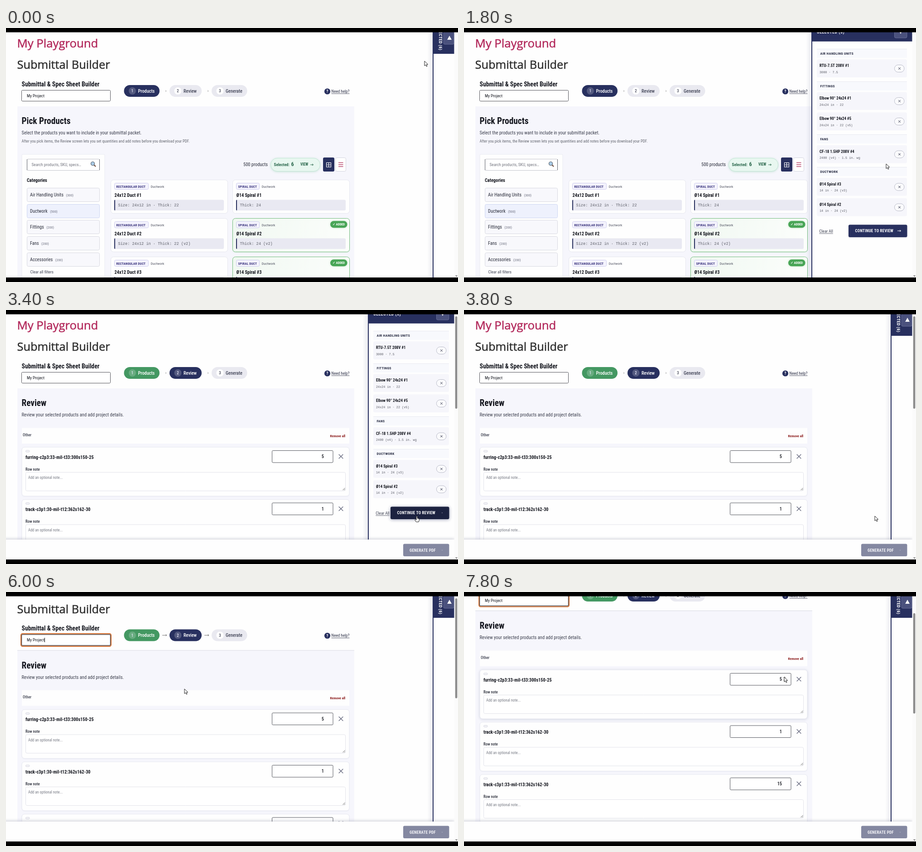
Write an HTML page with a canvas that moves like this. It is 998x561 px and loops after 8000 ms.

```html
<!DOCTYPE html>
<html lang="en">
<head>
<meta charset="utf-8">
<title>Submittal Builder</title>
<style>
html, body { margin: 0; width: 100%; height: 100%; overflow: hidden; background: #000; }
canvas { display: block; width: 998px; height: 561px; }
</style>
</head>
<body>
<canvas id="stage" width="998" height="561"></canvas>
<script>
const ctx = document.getElementById('stage').getContext('2d');
const LOOP = 8000, STEP = 200;
const NAVY = '#28305f', INK = '#15171f', PAGE = '#fefefe', GREEN = '#449862';
const FACE = '"Roboto Condensed", Roboto, sans-serif';
const MONO = '"Liberation Mono", monospace';

// Narrow the face only where no condensed cut is installed.
function widthOf(font) {
  ctx.font = font;
  return ctx.measureText('Select the products you want').width;
}
const ratio = widthOf('condensed 40px ' + FACE) / widthOf('40px Roboto, sans-serif');
const squeeze = ratio > 0.95 ? 0.885 : 1;

// Text centred vertically on y; returns the right edge.
function text(str, x, y, size, color, weight = 400, { align = 'left', gap = 0 } = {}) {
  ctx.save();
  ctx.font = `condensed ${weight} ${size}px ${FACE}`;
  ctx.letterSpacing = gap + 'px';
  ctx.fillStyle = color;
  ctx.textAlign = align;
  ctx.translate(x, y + size * 0.355);
  ctx.scale(squeeze, 1);
  ctx.fillText(str, 0, 0);
  const w = ctx.measureText(str).width * squeeze;
  ctx.restore();
  return x + w;
}

function mono(str, x, base, size) {
  ctx.font = `${size}px ${MONO}`;
  ctx.fillStyle = '#5c5e68';
  ctx.fillText(str, x, base);
}

// Regular face thickened slightly to a medium weight.
function heading(str, base, size, color) {
  ctx.font = `400 ${size}px "Open Sans", "Noto Sans", sans-serif`;
  ctx.fillStyle = ctx.strokeStyle = color;
  ctx.lineWidth = 0.55;
  ctx.fillText(str, 24.5, base);
  ctx.strokeText(str, 24.5, base);
}

function rect(x, y, w, h, fill) {
  ctx.fillStyle = fill;
  ctx.fillRect(x, y, w, h);
}

function box(x, y, w, h, r, fill, stroke, line = 1) {
  ctx.beginPath();
  ctx.roundRect(x, y, w, h, r);
  if (fill) { ctx.fillStyle = fill; ctx.fill(); }
  if (stroke) { ctx.strokeStyle = stroke; ctx.lineWidth = line; ctx.stroke(); }
}

function shadowed(color, blur, dy, draw) {
  ctx.save();
  ctx.shadowColor = color;
  ctx.shadowBlur = blur;
  ctx.shadowOffsetY = dy;
  draw();
  ctx.restore();
}

function disc(x, y, r, fill) {
  ctx.beginPath();
  ctx.arc(x, y, r, 0, 7);
  ctx.fillStyle = fill;
  ctx.fill();
}

function lines(color, width, ...segs) {
  ctx.strokeStyle = color;
  ctx.lineWidth = width;
  ctx.beginPath();
  for (const [x1, y1, x2, y2] of segs) { ctx.moveTo(x1, y1); ctx.lineTo(x2, y2); }
  ctx.stroke();
}

function poly(fill, ...pts) {
  ctx.beginPath();
  pts.forEach(([x, y]) => ctx.lineTo(x, y));
  ctx.closePath();
  ctx.fillStyle = fill;
  ctx.fill();
}

function arrow(x, y, w, color) {
  lines(color, 1, [x, y, x + w, y], [x + w - 2.5, y - 2, x + w, y], [x + w - 2.5, y + 2, x + w, y]);
}

// Piecewise linear value from [time, value...] keys.
function along(keys, t) {
  let a = keys[0];
  for (const b of keys) {
    if (t < b[0]) {
      const k = Math.max(0, (t - a[0]) / (b[0] - a[0]));
      return a.slice(1).map((v, i) => v + (b[i + 1] - v) * k);
    }
    a = b;
  }
  return a.slice(1);
}

const POINTER = [
  [0, 924, 73], [200, 945, 52], [400, 974, 24], [800, 974, 24], [1000, 948, 48], [1200, 948, 48],
  [1400, 946, 68], [1800, 932, 300], [2000, 918, 488], [2200, 910, 470], [2400, 907, 455],
  [3800, 907, 455], [4000, 890, 440], [4400, 751, 338], [4600, 560, 268], [4800, 262, 176],
  [5000, 160, 154], [5400, 160, 154], [5800, 394, 214], [6800, 394, 214], [7000, 450, 224],
  [7400, 640, 205], [7800, 707, 188]
];
const PANEL = [[0, 943], [600, 943], [800, 858], [1000, 775.5], [1200, 769], [1400, 768],
  [3200, 768], [3400, 800], [3600, 915], [3800, 943]];
const SCROLL = [[0, 0], [5600, 0], [5800, 24], [6000, 43.5], [6200, 58], [6400, 92], [6600, 122], [6800, 131]];

function pill(x, w, n, label, state) {
  const idle = state === 'idle';
  box(x, 126, w, 26, 13, idle ? '#e9e9f0' : state === 'done' ? GREEN : NAVY);
  disc(x + 18.5, 139, 8, idle ? '#fff' : 'rgba(255,255,255,.2)');
  text(n, x + 18.5, 139, 8.5, idle ? '#3c3f50' : '#eef', 500, { align: 'center' });
  text(label, x + 31, 139, 10.3, idle ? '#45485a' : '#fff', 500);
}

function header(t, review, scroll) {
  heading('My Playground', 43, 25.7, '#b32b5d');
  heading('Submittal Builder', 90, 25.4, '#303030');
  text('Submittal & Spec Sheet Builder', 34.5, 124, 13.75, INK, 700);

  const focus = review && t >= 5000;
  if (t >= 5200) box(33, 135.5, 199, 28, 3.5, null, '#d8702f', 2);
  box(34.5, 137.5, 196, 24, 2, '#fff', focus && t < 5200 ? '#6a3a30' : '#55565c', focus ? 1.5 : 1);
  const end = text('My Project', 46, 149.5, 9.25, INK);
  if (focus && t % 1000 < 500) rect(end, 144.5, 1, 10, '#111');

  pill(260.5, 78.5, '1', 'Products', review ? 'done' : 'active');
  pill(361, 71, '2', 'Review', review ? 'active' : 'idle');
  pill(454, 78.5, '3', 'Generate', 'idle');
  for (const x of [353, 446]) {
    if (scroll > 0) arrow(x - 8, 139, 10, '#777');
    else text('›', x, 138.5, 9, '#666', 400, { align: 'center' });
  }
  disc(709.5, 140, 6.6, NAVY);
  text('?', 709.5, 140, 8.5, '#fff', 700, { align: 'center' });
  const right = text('Need help?', 718.5, 139.5, 9.15, '#2b2f45');
  lines('#2b2f45', 0.8, [718.5, 145, right, 145]);

  rect(25, 173, 744, 1400, '#f6f6fc');
  if (scroll > 0) lines('#d6d8e2', 1, [25, 172.5, 769, 172.5]);
}

function sidebar() {
  box(35, 279, 183, 300, 2, PAGE, '#e9eaf1');
  box(46.5, 289.5, 160, 25, 2, '#fff', '#c4c5cc');
  lines('#5c5e68', 1, [46.5, 290, 46.5, 314], [206.5, 290, 206.5, 314]);
  text('Search products, SKU, specs…', 56.5, 302, 9.25, '#73757f');
  lines('#6b4a3a', 2.2, [194.5, 302.5, 198, 306]);
  disc(191.5, 299.5, 4, '#a9cbe6');
  ctx.strokeStyle = '#59616c';
  ctx.lineWidth = 1.2;
  ctx.stroke();
  text('Categories', 46, 336.5, 10.3, INK, 700);
  const items = [['Air Handling Units', 300], ['Ductwork', 500], ['Fittings', 200], ['Fans', 200], ['Accessories', 200]];
  items.forEach(([name, count], i) => {
    const y = 353.5 + Math.round(i * 35.7), on = i === 1;
    box(46.5, y, 160, 30, 3, on ? '#eef1fd' : '#f8f8fc', on ? '#cdd5f2' : '#d8d9e1');
    const end = text(name, 53, y + 15.3, 10.4, '#2a2d3a');
    text(`(${count})`, end + 5.5, y + 16, 7.9, '#6d7080');
  });
  text('Clear all filters', 53.5, 539, 9.05, '#3d4152');
}

function toolbar() {
  text('500 products', 524, 301.5, 10.4, '#2a2d3a');
  shadowed('rgba(70,170,120,.3)', 5, 1, () => box(584.5, 287.5, 109, 29, 14.5, '#e8f7f0'));
  box(584.5, 287.5, 109, 29, 14.5, null, '#c2e6d5');
  text('Selected:', 591.5, 301.5, 9.1, '#2d6a4f', 700);
  text('6', 629.5, 301, 12.2, '#2d6a4f', 700);
  text('VIEW', 650, 301.5, 8.3, '#2d6a4f', 700);
  arrow(672, 302, 6.5, '#2d6a4f');
  box(700, 286, 25, 31, 3, NAVY);
  ctx.strokeStyle = '#fff';
  ctx.lineWidth = 1.1;
  ctx.strokeRect(707.5, 297.5, 10, 9.5);
  lines('#fff', 1.1, [712.5, 297.5, 712.5, 307], [707.5, 302.2, 717.5, 302.2]);
  box(727.5, 286.5, 23, 30, 3, '#fff', '#d3d4de');
  lines('#b8476d', 1.4, ...[297.5, 301.8, 306].map(y => [734, y, 744.5, y]));
}

function product(x, y, tag, tagW, title, spec, added) {
  if (added) {
    const g = ctx.createLinearGradient(x, y, x + 258, y + 74);
    g.addColorStop(0, '#f0f8f1');
    g.addColorStop(1, '#fcfefc');
    shadowed('rgba(76,175,80,.2)', 3, 1, () => box(x, y, 258, 74, 6, g));
    box(x, y, 258, 74, 6, null, '#76bd80');
    shadowed('rgba(76,175,80,.35)', 4, 0, () => box(x + 215.5, y + 5.8, 37.5, 15, 7.5, '#48a556'));
    text('✓ ADDED', x + 234, y + 13.2, 7, '#fff', 700, { align: 'center' });
  } else {
    box(x, y, 258, 74, 6, PAGE, '#e6e7ef');
  }
  box(x + 8, y + 7, tagW, 14, 3, '#f4f3fd', '#cfcdee');
  text(tag, x + 12, y + 14.5, 7.2, '#38327c', 700, { gap: 0.2 });
  text('Ductwork', x + tagW + 13, y + 14.3, 8, '#555866');
  text(title, x + 8, y + 33.7, 10.3, INK, 700);
  box(x + 7.5, y + 44, 242, 23.5, 3, '#e9e9f2');
  box(x + 7.5, y + 44, 2, 23.5, [2, 0, 0, 2], NAVY);
  mono(spec, x + 16, y + 58, 8.6);
}

function products() {
  text('Pick Products', 34.5, 205.5, 19.35, INK, 700);
  text('Select the products you want to include in your submittal packet.', 34.5, 231.5, 10.42, '#3b3e4c');
  text('After you pick items, the Review screen lets you set quantities and add notes before you download your PDF.',
    34.5, 249.5, 8.72, '#63666f');
  sidebar();
  toolbar();
  for (let i = 0; i < 3; i++) {
    const y = 335.5 + i * 85, v = i ? ` (v${i + 1})` : '';
    product(231.5, y, 'RECTANGULAR DUCT', 75, `24x12 Duct #${i + 1}`, 'Size: 24x12 in · Thick: 22' + v);
    product(500.5, y, 'SPIRAL DUCT', 51, `Ø14 Spiral #${i + 1}`, 'Thick: 24' + v, i > 0);
  }
}

function row(y, name, qty, hover) {
  shadowed(`rgba(40,48,95,${hover ? 0.2 : 0.06})`, hover ? 6 : 3, 1,
    () => box(35, y, 723, 108, 6, PAGE));
  box(35, y, 723, 108, 6, null, '#e8e9f1');
  box(43.5, y + 7, 8.5, 3.8, 2, '#f4f4f8', '#cfd0da', 0.8);
  text(name, 43, y + 22, 10.2, INK, 700);
  box(587.5, y + 7.5, 134.5, 26.5, 2, '#fff', '#55575f');
  text(qty, 702, y + 20.5, 10.3, INK, 500, { align: 'right' });
  if (hover) lines('#888', 1, [705, y + 18, 708, y + 15], [708, y + 15, 711, y + 18], [705, y + 22, 708, y + 25], [708, y + 25, 711, y + 22]);
  lines('#6a6d82', 1.4, [734.7, y + 15.7, 744.3, y + 25.3], [744.3, y + 15.7, 734.7, y + 25.3]);
  text('Row note', 43, y + 48.5, 8.6, '#30333f', 500);
  box(43.5, y + 55.5, 706, 41, 3, '#fff', '#e2e3ea');
  text('Add an optional note...', 49, y + 67.2, 8.5, '#777a84');
  lines('#555', 0.9, [743.5, y + 95, 748.5, y + 90], [746.5, y + 95, 748.5, y + 93]);
}

function reviewPage(t) {
  text('Review', 34.5, 205.5, 19.3, INK, 700);
  text('Review your selected products and add project details.', 34.5, 231.5, 10.5, '#3b3e4c');
  rect(35, 260.5, 723, 34.5, PAGE);
  text('Other', 37, 275.8, 8.7, '#5b5e6b', 700);
  text('Remove all', 715.5, 278, 7.7, '#8e2020', 700);
  row(303, 'furring-c2p3:33-mil-t33:300s150-25', '5', t >= 7600);
  row(418.5, 'track-c3p1:30-mil-t12:362s162-30', '1');
  row(534, 'track-c3p1:33-mil-t13:362s162-30', '15');
}

function closedPanel() {
  rect(943, 9, 47, 542, PAGE);
  rect(942, 9, 2, 542, NAVY);
  rect(942, 9, 47.5, 48, NAVY);
  ctx.save();
  ctx.translate(959, 49);
  ctx.rotate(Math.PI / 2);
  text('SELECTED (6)', 0, 0, 9.8, '#fff', 700, { align: 'right', gap: 0.2 });
  ctx.restore();
  box(966, 8, 23, 28, 3, '#4a517d', '#7178a0', 0.8);
  poly('#fff', [974.2, 26], [984, 26], [979.1, 17]);
}

const PICKS = [
  ['AIR HANDLING UNITS', 56], ['FITTINGS', 128], ['FANS', 245], ['DUCTWORK', 317],
  ['RTU-7.5T 208V #1', 89.5, '3000 · 7.5'],
  ['Elbow 90° 24x24 #1', 161.5, '24x24 in · 22'],
  ['Elbow 90° 24x24 #5', 206.5, '24x24 in · 22 (v5)'],
  ['CF-18 1.5HP 208V #4', 279, '2400 (v4) · 1.5 in. wg'],
  ['Ø14 Spiral #3', 351, '14 in · 24 (v3)'],
  ['Ø14 Spiral #2', 396, '14 in · 24 (v2)']
];

function openPanel(x, hover) {
  ctx.save();
  ctx.beginPath();
  ctx.rect(x - 1, 9, 990.5 - x, 542);
  ctx.clip();
  rect(x, 9, 222, 542, PAGE);
  rect(x - 1, 9, 2, 542, NAVY);
  rect(x - 1, 9, 223, 20.7, NAVY);
  text('SELECTED (6)', x + 11, 8.5, 10.2, '#fff', 700, { gap: 0.4 });
  box(950.5, -6, 27.5, 28, 3, '#4a517d', '#7178a0', 0.8);
  poly('#fff', [959.5, 5], [968.5, 5], [964, 13]);
  for (const [name, y, spec] of PICKS) {
    if (!spec) {
      rect(x + 11, y - 10, 967 - x, 20, '#f8f9fd');
      lines('#e8e9f1', 1, [x + 11, y - 9.5, 978, y - 9.5]);
      text(name, x + 18.5, y, 7.8, '#2b2f45', 700, { gap: 0.3 });
      continue;
    }
    box(x + 11, y - 20, 967 - x, 39.5, 3, '#f6f6fb');
    text(name, x + 17, y - 6.5, 8.8, INK, 700);
    mono(spec, x + 17, y + 10, 6.8);
    box(950.5, y - 8, 21.5, 16, 8, '#fbfbfd', '#b9bbc8');
    lines('#2b2f45', 1, [959.2, y - 2.3, 963.8, y + 2.3], [963.8, y - 2.3, 959.2, y + 2.3]);
  }
  const right = text('Clear All', x + 16.3, 448.5, 9.2, '#3d4152');
  lines('#3d4152', 0.8, [x + 16.3, 454, right, 454]);
  shadowed(hover ? 'rgba(40,48,95,.5)' : 'rgba(40,48,95,.2)', hover ? 7 : 3, 1,
    () => box(849, 434.5, 129.5, 27.5, 3, hover ? '#1c2240' : NAVY));
  text('CONTINUE TO REVIEW', 863.5, 448, 9, '#fff', 700, { gap: 0.2 });
  if (hover) disc(963, 448, 0.8, '#aab');
  else arrow(957, 448, 7.5, '#fff');
  ctx.restore();
}

function panel(t, x) {
  const g = ctx.createLinearGradient(x - 13, 0, x, 0);
  g.addColorStop(0, 'rgba(40,48,95,0)');
  g.addColorStop(1, 'rgba(40,48,95,.1)');
  rect(x - 13, 9, 13, 542, g);
  if (x > 940) closedPanel();
  else openPanel(x, t >= 2600);
}

function footer() {
  shadowed('rgba(30,35,70,.25)', 7, -1, () => rect(-10, 507, 1000, 60, PAGE));
  box(877, 516.5, 101.5, 27.5, 3, '#8488a1');
  text('GENERATE PDF', 891, 530.5, 9, '#f4f4f8', 700, { gap: 0.2 });
  disc(963, 530.5, 0.8, '#b9bccb');
}

function scrollbar(review, scroll) {
  rect(990, 9, 8, 542, '#fbfbfb');
  poly('#777', [991.8, 546.5], [997, 546.5], [994.4, 549.5]);
  if (!review) return;
  const top = 14 + Math.max(0, scroll - 43.5) * 0.375;
  box(991.8, top, 4.6, 218 + scroll * 0.385 - top, 2.3, '#8d8d8d');
}

function pointer(t, x, y) {
  ctx.save();
  ctx.translate(x, y);
  ctx.lineJoin = 'round';
  const hand = (t >= 400 && t <= 800) || (t >= 2400 && t < 3600);
  if (t >= 4800 && t <= 5400) {
    lines('#222', 1, [0, -4.5, 0, 4.5], [-2, -5, 2, -5], [-2, 5, 2, 5]);
  } else if (hand) {
    ctx.beginPath();
    ctx.moveTo(-1, 1);
    ctx.quadraticCurveTo(0, -0.5, 1.2, 1);
    for (const [px, py] of [[1.2, 5], [5, 6], [5.3, 9.5], [4, 13], [-1.5, 13], [-4.5, 8.5], [-3.5, 7.5], [-1, 9]]) ctx.lineTo(px, py);
    ctx.closePath();
    ctx.fillStyle = '#fff';
    ctx.fill();
    ctx.strokeStyle = '#222';
    ctx.lineWidth = 1;
    ctx.stroke();
  } else {
    poly('#fff', [0, 0], [0, 10.5], [2.5, 8.3], [4.2, 12], [6, 11.2], [4.4, 7.6], [7.5, 7.3]);
    ctx.strokeStyle = '#222';
    ctx.lineWidth = 1;
    ctx.stroke();
  }
  ctx.restore();
}

function draw(t) {
  const review = t >= 3400;
  const [scroll] = along(SCROLL, t), [x] = along(PANEL, t);
  rect(0, 0, 998, 561, PAGE);
  ctx.save();
  ctx.translate(0, -scroll);
  header(t, review, scroll);
  if (review) reviewPage(t);
  else products();
  ctx.restore();
  panel(t, x);
  if (review) footer();
  scrollbar(review, scroll);
  pointer(t, ...along(POINTER, t));
  rect(0, 0, 998, 9.5, '#000');
  rect(0, 551, 998, 10, '#000');
}

const start = performance.now();
function tick() {
  const t = (performance.now() - start) % LOOP;
  draw(Math.floor(t / STEP) * STEP);
  requestAnimationFrame(tick);
}
tick();
</script>
</body>
</html>
```
